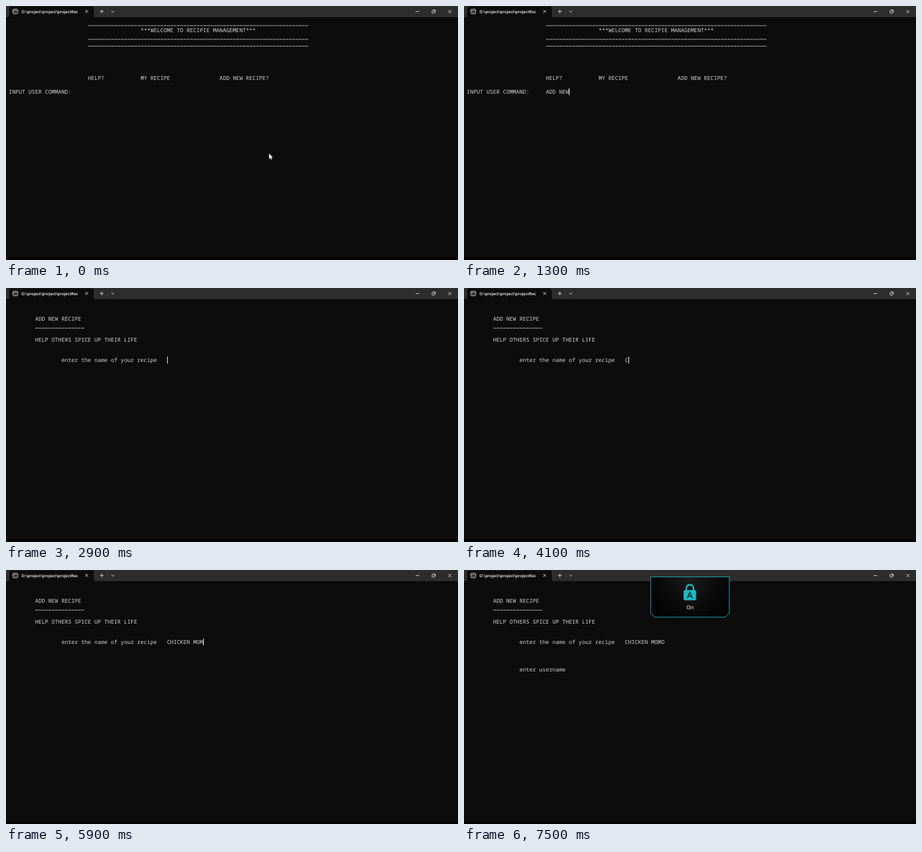
Animation of 690x388 px, one loop 8000 ms. Source, as an HTML page:

```html
<!DOCTYPE html>
<html lang="en">
<head>
<meta charset="utf-8">
<title>Recipe console</title>
<style>
  html, body { margin: 0; width: 100%; height: 100%; overflow: hidden; background: #0c0c0c; }
  svg { display: block; width: 100vw; height: 100vh; }
  text { white-space: pre; text-rendering: geometricPrecision; }
  .mono { font: 8.38px "Noto Sans Mono", "DejaVu Sans Mono", monospace; fill: #d2d2d2; }
  .ui { font-family: "Open Sans", "Noto Sans", sans-serif; fill: #fff; }
  .icon { fill: none; stroke: #f0f0f0; stroke-width: .8; }
</style>
</head>
<body>
<svg viewBox="0 0 690 388">
  <defs>
    <linearGradient id="panel" x1="0" y1="0" x2="1" y2="0">
      <stop offset="0" stop-color="#050505"/>
      <stop offset=".5" stop-color="#1d1d1d"/>
      <stop offset="1" stop-color="#050505"/>
    </linearGradient>
    <linearGradient id="shade" x1="0" y1="0" x2="0" y2="1">
      <stop offset="0" stop-color="#000" stop-opacity="0"/>
      <stop offset="1" stop-color="#000" stop-opacity=".75"/>
    </linearGradient>
  </defs>

  <rect width="690" height="388" fill="#0c0c0c"/>
  <rect y="384" width="690" height="4" fill="#040404"/>

  <!-- title bar -->
  <rect width="690" height="17" fill="#2d2d2d"/>
  <path d="M3 17Q5 17 5 15V3Q5 .5 7.5 .5H131.500Q134 .5 134 3V15Q134 17 136 17Z" fill="#0c0c0c"/>
  <g class="icon">
    <rect x="10.500" y="4.900" width="7.400" height="7" rx="1.500"/>
    <path d="M10.500 7H17.900M12.200 8.700L13.200 9.500L12.200 10.300M14.300 10.300H16.200"/>
    <path d="M120.900 6.100L125.300 10.500M125.300 6.100L120.900 10.500"/>
    <path d="M143.300 8.300H149.100M146.200 5.400V11.200"/>
    <path d="M160.800 7.400L163 9.500L165.200 7.400"/>
    <path d="M625.400 8.500H630.800"/>
    <rect x="650.400" y="7" width="3.800" height="3.900" rx=".7"/>
    <path d="M651.700 5.900H654.300Q655.400 5.900 655.400 7V9.700"/>
    <path d="M675.100 6.100L679.900 10.900M679.900 6.100L675.100 10.900"/>
  </g>
  <path d="M155.500 4V13" stroke="#444" stroke-width=".6"/>
  <text class="ui" x="23.800" y="10.700" font-size="6.150" font-weight="600">D:\project\project\projectRec</text>

  <g id="menu"></g>
  <g id="form"></g>
  <g id="user"></g>
  <rect id="caret" width="1" height="10.600" fill="#e8e8e8"/>
  <path id="mouse" d="M401.500 225V234L403.500 232.200L404.900 235L406.200 234.400L404.900 231.700H407.600Z"
        fill="#fff" stroke="#222" stroke-width=".3"/>

  <!-- lock notice -->
  <g id="notice">
    <path d="M285 10.500H405V66L399 72H291L285 66Z" fill="url(#panel)"/>
    <path d="M285 10.500H405V66L399 72H291L285 66Z" fill="url(#shade)" stroke="#1aa5ac"/>
    <path d="M339.300 32V27.800A5.500 5.300 0 0 1 350.300 27.800V32" fill="none" stroke="#16bcc6" stroke-width="2.300"/>
    <rect x="335.200" y="30.800" width="19" height="15.400" rx="2" fill="#16bcc6"/>
    <path d="M340.700 43.200L344.700 33.700L348.700 43.200M342.200 40.200H347.200" fill="none" stroke="#101414" stroke-width="1.400"/>
    <text class="ui" x="345.200" y="60" font-size="8.300" text-anchor="middle">On</text>
  </g>
</svg>

<script>
const NS = "http://www.w3.org/2000/svg";
const LOOP = 8000, CELL = 5.03, ROW = 10.43;
const $ = id => document.getElementById(id);
const colX = col => 4.2 + col * CELL;
const rowY = row => 26.6 + row * ROW;

function add(parent, tag, attrs) {
  const el = document.createElementNS(NS, tag);
  for (const k in attrs) el.setAttribute(k, attrs[k]);
  return parent.appendChild(el);
}

function print(parent, col, row, str) {
  const el = add(parent, "text", { class: "mono", x: colX(col), y: rowY(row) + 3 });
  el.textContent = str;
  return el;
}

function rule(parent, col, row, count) {
  const y = rowY(row) + 3.4, x = colX(col) + 0.3;
  add(parent, "path", {
    d: `M${x} ${y}H${x + count * CELL - 0.7}`,
    stroke: "#c4c4c4", "stroke-width": 0.9, "stroke-dasharray": `4.33 ${CELL - 4.33}`
  });
}

const menu = $("menu"), form = $("form"), user = $("user");
for (const row of [0, 2, 3]) rule(menu, 24, row, 67);
print(menu, 40, 1, "***WELCOME TO RECIPIE MANAGEMENT***");
print(menu, 24, 8, "HELP?");
print(menu, 40, 8, "MY RECIPE");
print(menu, 64, 8, "ADD NEW RECIPE?");
print(menu, 0, 10, "INPUT USER COMMAND:");

print(form, 8, 2, "ADD NEW RECIPE");
rule(form, 8, 3, 15);
print(form, 8, 5, "HELP OTHERS SPICE UP THEIR LIFE");
print(form, 16, 8, "enter the name of your recipe");
print(user, 16, 12, "enter username");

// Key press times for each typed line
function entry(parent, col, row, str, keys) {
  const el = print(parent, col, row, "");
  return t => {
    const n = keys.filter(k => k <= t).length;
    el.textContent = str.slice(0, n);
    return [col + n, row];
  };
}
const typeCommand = entry(menu, 24, 10, "ADD NEW RECIPE",
  [300, 600, 800, 1000, 1100, 1200, 1300, 1500, 1800, 1900, 2100, 2200, 2300, 2500]);
const typeName = entry(form, 48, 8, "CHICKEN MOMO",
  [4100, 4200, 4300, 4400, 4500, 5000, 5200, 5500, 5700, 5800, 5900, 6000]);

const within = (t, a, b) => t >= a && t < b;
const show = (el, on) => el.setAttribute("visibility", on ? "visible" : "hidden");

function draw(t) {
  const command = typeCommand(t), name = typeName(t);
  const [col, row] = t < 2900 ? command : t < 6600 ? name : [32, 12];
  const caret = $("caret");
  caret.setAttribute("x", Math.round(colX(col)));
  caret.setAttribute("y", rowY(row) - 5.3);
  show(caret, within(t, 200, 3500) || within(t, 4100, 7500));
  show(menu, t < 2900);
  show(form, t >= 2900);
  show(user, t >= 6600);
  show($("mouse"), t < 300);
  show($("notice"), t >= 6800);
}

function tick() {
  draw(performance.now() % LOOP);
  requestAnimationFrame(tick);
}
tick();
</script>
</body>
</html>
```
